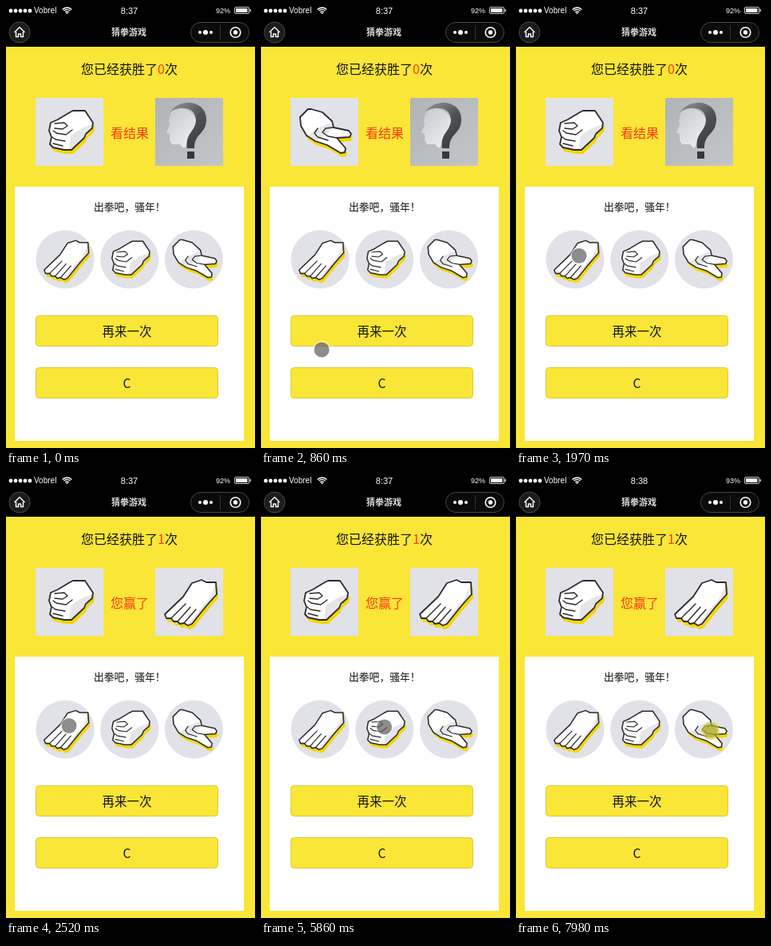
Write an HTML page with a canvas that moves like this. It is 312 px wide and 553 px high and loops after 8 s.

```html
<!DOCTYPE html>
<html lang="zh-CN">
<head>
<meta charset="utf-8">
<title>猜拳游戏</title>
<style>
html, body { margin: 0; width: 100%; height: 100%; overflow: hidden; background: #fae637; }
canvas { display: block; width: 312px; height: 553px; }
</style>
</head>
<body>
<canvas id="stage"></canvas>
<script>
const W = 312, H = 553, LOOP = 8000;
const canvas = document.getElementById('stage');
const ctx = canvas.getContext('2d');
const dpr = window.devicePixelRatio || 1;
canvas.width = W * dpr;
canvas.height = H * dpr;

const YELLOW = '#fae637', TILE = '#e1e1e8', RED = '#fb3a14';
const CJK = '"Noto Sans CJK SC", "Noto Sans CJK", sans-serif';
const LATIN = '"Liberation Sans", Arial, sans-serif';

// Hands live in an 85 x 85 box.
const HANDS = {
  paper: {
    body: [46,19, 58,15, 64,18, 76,18, 77,33, 68,43, 62,50, 46,70, 41,72, 36,69, 31,70, 28,67, 23,67, 20,63, 14,63, 12,58, 35,36],
    shade: [76,20, 77,33, 62,50, 46,70, 42,70, 59,48, 67,40],
    lines: [[20,63, 38,45], [28,67, 44,49], [36,69, 51,52]]
  },
  rock: {
    body: [28,27, 43,18, 47,16, 62,16, 72,31, 71,38, 63,45, 61,50, 45,65, 36,65, 22,62, 18,58, 20,49, 17,41, 19,31],
    shade: [71,33, 71,38, 61,50, 45,65, 42,64, 44,47, 58,38],
    lines: [[24,32, 36,31, 40,35, 34,39, 24,38], [22,41, 26,44, 38,46, 46,40], [21,49, 25,52, 37,54], [22,57, 34,60]]
  },
  scissors: {
    body: [12,24, 22,14, 26,14, 40,18, 52,29, 54,37, 73,41, 76,45, 74,49, 58,50, 69,63, 68,68, 63,69, 46,59, 31,54, 20,47, 13,35],
    shade: [34,38, 50,31, 53,37, 46,45, 32,53, 22,47],
    lines: [[53,37, 44,38, 40,43, 47,48, 58,50], [34,38, 30,44, 34,49, 47,53]]
  }
};

// Times at which the shuffled hand changes.
const PICKS = '0r 70s 300p 380r 540s 620p 780r 860s 1020r 1180s 1260p 1340r 1420s 1580r 1660p 1970r 2120p 2360r'
  .split(' ').map(s => [parseInt(s), { r: 'rock', p: 'paper', s: 'scissors' }[s.slice(-1)]]);

const MOVES = [
  { t0: 660, t1: 1240, step: 580 % 80 + 20, from: [75.5, 453], to: [79, 312.5] },
  { t0: 5340, t1: 5860, step: 80, from: [79, 312.5], to: [154.5, 314] },
  { t0: 6870, t1: 7590, step: 80, from: [171, 314], to: [244, 319], rest: [154.5, 314] }
];
const PRESSES = [[2360, 2440], [6170, 6250], [7980, 8000]];
const RESULT_AT = 2440, MINUTE_AT = 7270;

const ease = p => p < .5 ? 4 * p ** 3 : 1 - 4 * (1 - p) ** 3;

function poly(pts, close, dx = 0, dy = 0) {
  ctx.beginPath();
  for (let i = 0; i < pts.length; i += 2) ctx.lineTo(pts[i] + dx, pts[i + 1] + dy);
  if (close) ctx.closePath();
}

function disc(x, y, r, fill) {
  ctx.beginPath();
  ctx.arc(x, y, r, 0, Math.PI * 2);
  ctx.fillStyle = fill;
  ctx.fill();
}

function ring(x, y, r, color, width) {
  ctx.beginPath();
  ctx.arc(x, y, r, 0, Math.PI * 2);
  ctx.strokeStyle = color;
  ctx.lineWidth = width;
  ctx.stroke();
}

function rect(x, y, w, h, fill) {
  ctx.fillStyle = fill;
  ctx.fillRect(x, y, w, h);
}

function box(x, y, w, h, r, fill, stroke) {
  ctx.beginPath();
  ctx.roundRect(x, y, w, h, r);
  ctx.lineWidth = 1;
  if (fill) { ctx.fillStyle = fill; ctx.fill(); }
  if (stroke) { ctx.strokeStyle = stroke; ctx.stroke(); }
}

function text(str, x, y, font, fill, align = 'left') {
  ctx.font = font;
  ctx.fillStyle = fill;
  ctx.textAlign = align;
  ctx.fillText(str, x, y);
  return ctx.measureText(str).width;
}

function hand(kind, x, y, size) {
  const h = HANDS[kind];
  ctx.save();
  ctx.translate(x, y);
  ctx.scale(size / 85, size / 85);
  ctx.lineJoin = ctx.lineCap = 'round';
  poly(h.body, true, 2, 5);
  ctx.fillStyle = '#f3d600';
  ctx.fill();
  poly(h.body, true);
  ctx.fillStyle = '#fff';
  ctx.fill();
  poly(h.shade, true);
  ctx.fillStyle = '#e6e6ea';
  ctx.fill();
  ctx.strokeStyle = '#2c2c2c';
  ctx.lineWidth = 1.8;
  poly(h.body, true);
  ctx.stroke();
  ctx.lineWidth = 1.4;
  for (const l of h.lines) { poly(l); ctx.stroke(); }
  ctx.restore();
}

function handCard(kind, x) {
  rect(x, 115, 85, 85, TILE);
  hand(kind, x, 115, 85);
}

function mysteryCard(x, y) {
  ctx.save();
  ctx.translate(x, y);
  const bg = ctx.createLinearGradient(0, 0, 85, 85);
  bg.addColorStop(0, '#b0b4b6');
  bg.addColorStop(1, '#c3c6c8');
  rect(0, 0, 85, 85, bg);

  const skin = ctx.createLinearGradient(14, 20, 50, 55);
  skin.addColorStop(0, '#c9ccce');
  skin.addColorStop(1, '#eceeef');
  ctx.beginPath();
  ctx.moveTo(24, 13);
  ctx.quadraticCurveTo(15, 23, 18, 34);
  for (const [px, py] of [[14, 43], [18, 45], [18, 53], [21, 58], [31, 58], [36, 63], [45, 50]]) ctx.lineTo(px, py);
  ctx.bezierCurveTo(60, 34, 50, 10, 24, 13);
  ctx.fillStyle = skin;
  ctx.fill();

  const ink = ctx.createLinearGradient(20, 8, 60, 60);
  ink.addColorStop(0, '#8e9294');
  ink.addColorStop(.5, '#4f5254');
  ink.addColorStop(1, '#383a3c');
  ctx.beginPath();
  ctx.moveTo(19, 17);
  ctx.bezierCurveTo(32, -1, 65, 3, 64, 28);
  ctx.bezierCurveTo(63, 46, 49, 44, 49, 63);
  ctx.lineTo(40, 63);
  ctx.bezierCurveTo(37, 44, 51, 42, 51, 27);
  ctx.bezierCurveTo(50, 11, 32, 10, 19, 17);
  ctx.fillStyle = ink;
  ctx.fill();
  rect(40, 67, 9, 9, '#353739');
  ctx.restore();
}

function statusBar(t) {
  const late = t >= MINUTE_AT;
  rect(0, 0, W, 51, '#000');
  for (let i = 0; i < 5; i++) disc(6 + i * 6, 6, 2.4, '#fff');
  text('Vobrel', 35, 9, '10px ' + LATIN, '#fff');
  for (const r of [3, 5.6, 8]) {
    ctx.beginPath();
    ctx.arc(76.5, 10, r, -Math.PI * .76, -Math.PI * .24);
    ctx.strokeStyle = '#fff';
    ctx.lineWidth = 1.3;
    ctx.stroke();
  }
  disc(76.5, 9, 1, '#fff');
  text(late ? '8:38' : '8:37', 154.5, 9.5, '11px ' + LATIN, '#fff', 'center');
  text(late ? '93%' : '92%', 263, 9, '9px ' + LATIN, '#fff');
  box(286.5, 1.5, 18, 8, 1.5, null, '#ccc');
  rect(288, 3, 14.5, 5, '#fff');
  rect(305.5, 4, 1.5, 3, '#ccc');
}

function navBar() {
  disc(17, 33, 13, '#1c1c1c');
  ring(17, 33, 13, '#4a4a4a', 1);
  ctx.strokeStyle = '#fff';
  ctx.lineWidth = 1.4;
  ctx.lineJoin = 'round';
  poly([10.5, 33, 17, 26.5, 23.5, 33]);
  ctx.stroke();
  poly([12.5, 32, 12.5, 38.5, 15.5, 38.5, 15.5, 35, 18.5, 35, 18.5, 38.5, 21.5, 38.5, 21.5, 32]);
  ctx.stroke();
  text('猜拳游戏', 154, 37, 'bold 11px ' + CJK, '#ddd', 'center');
  box(231.5, 20.5, 73, 25, 12.5, '#0b0b0b', '#464646');
  rect(268, 24, 1, 18, '#333');
  disc(243, 33, 2, '#fff');
  disc(250, 33, 3, '#fff');
  disc(257, 33, 2, '#fff');
  ring(287.5, 33, 6.3, '#fff', 1.6);
  disc(287.5, 33, 2.7, '#fff');
}

function score(won) {
  const font = '16px ' + CJK;
  let x = 94;
  x += text('您已经获胜了', x, 85, font, '#111');
  x += text(won ? '1' : '0', x, 85, font, RED);
  text('次', x, 85, font, '#111');
}

function button(label, y) {
  box(37.5, y + .5, 228, 38, 4, YELLOW, '#dbc83a');
  text(label, 151.5, y + 26, '15.5px ' + CJK, '#111', 'center');
}

function cursorAt(t) {
  let pos = MOVES[0].from;
  for (const m of MOVES) {
    if (t < m.t0) break;
    const held = m.t0 + Math.floor((t - m.t0) / m.step) * m.step;
    const p = t >= m.t1 ? 1 : ease((held - m.t0) / (m.t1 - m.t0));
    pos = m.from.map((a, i) => a + (m.to[i] - a) * p);
  }
  return pos;
}

function cursor(t) {
  if (t < 460) return;
  const [x, y] = cursorAt(t);
  if (PRESSES.some(([a, b]) => t >= a && t < b)) {
    disc(x, y, 11, 'rgba(205,196,30,.6)');
    disc(x, y, 8.5, 'rgba(140,135,20,.4)');
  } else {
    ring(x, y, 10, 'rgba(255,255,255,.5)', 2);
    disc(x, y, 9.5, 'rgba(92,92,92,.7)');
  }
}

function draw(t) {
  const won = t >= RESULT_AT;
  ctx.setTransform(dpr, 0, 0, dpr, 0, 0);
  rect(0, 0, W, H, YELLOW);
  statusBar(t);
  navBar();
  score(won);

  handCard(PICKS.filter(p => p[0] <= t).pop()[1], 37);
  if (won) handCard('paper', 187);
  else mysteryCard(187, 115);
  text(won ? '您赢了' : '看结果', 155, 164.5, '16px ' + CJK, RED, 'center');

  rect(11, 226, 287, 318, '#fff');
  text('出拳吧，骚年！', 110, 256, '12.8px ' + CJK, '#111');
  ['paper', 'rock', 'scissors'].forEach((kind, i) => {
    const x = 74 + i * 80.7;
    disc(x, 317, 36.5, TILE);
    hand(kind, x - 36.5, 280.5, 73);
  });
  button('再来一次', 387);
  button('C', 452);
  cursor(t);
}

const start = performance.now();
function frame() {
  draw((performance.now() - start) % LOOP);
  requestAnimationFrame(frame);
}
frame();
</script>
</body>
</html>
```
